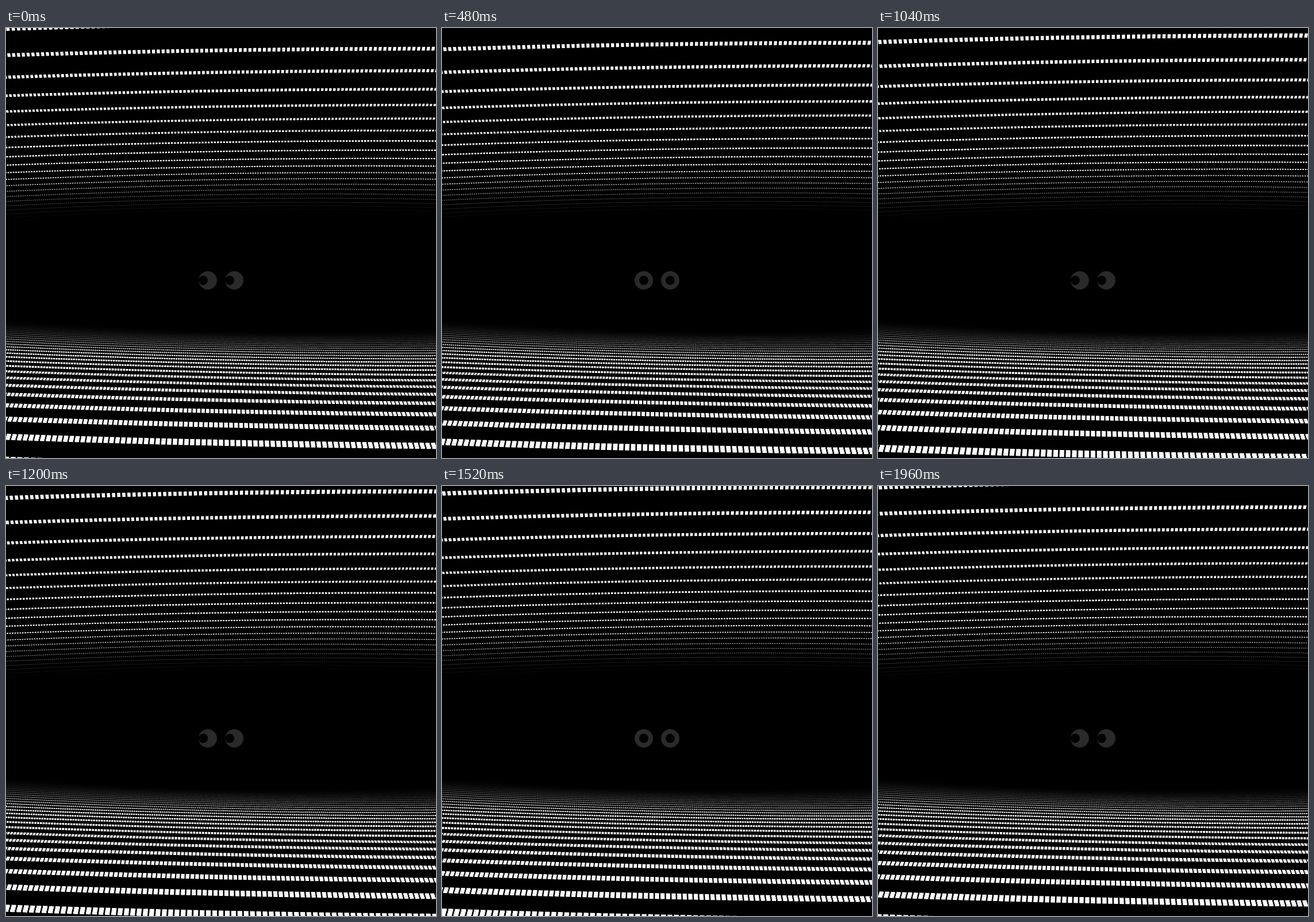
An HTML page without scripts that plays this animation: 748 by 748 pixels, repeating every 2000 ms.

```html
<!DOCTYPE html>
<html lang="en">
<head>
<meta charset="utf-8">
<title>Eyes between two dotted planes</title>
<style>
@property --t { syntax: "<number>"; inherits: true; initial-value: 0; }

html, body { margin: 0; width: 100%; height: 100%; overflow: hidden; background: #000; }
svg { display: block; width: 748px; height: 748px; animation: flow 2s linear infinite; }
@keyframes flow { from { --t: 0; } to { --t: 1; } }

/* --g side, --z0 nearest depth, --a plane height, --th dot height at --u0 */
.sky {
  --g: -1; --z0: 9.485; --a: 4604; --tilt: 5.75; --bow: 2.9;
  --th: 6.3; --u0: 440; --e: 1.8; --gap: .0191; --on: .62;
  --far: 30.485; --fade: 11;
}
.floor {
  --g: 1; --z0: 6.88; --a: 1675; --tilt: 8; --bow: 2.5;
  --th: 10.3; --u0: 243; --e: 1.6; --gap: .0411; --on: .74;
  --far: 34.88; --fade: 18;
}

/* one row of dots: depth z gives the distance u from the horizon */
path {
  --s: 0;
  --n: 1;
  --i: calc(var(--k) - var(--t));
  --z: calc(var(--z0) + var(--i));
  --u: calc(var(--a) / var(--z));
  --w: calc(var(--th) * pow(var(--u) / var(--u0), var(--e)));
  --p: calc(var(--gap) * (var(--u) + var(--s) * var(--w) * .07));
  d: path("M0 0Q.5 0 1 1M0 0Q-.5 0 -1 1");
  fill: none;
  stroke: #fff;
  vector-effect: non-scaling-stroke;
  transform: matrix(380, calc(var(--g) * var(--tilt)), 0,
    calc(var(--g) * -1 * (var(--bow) + .015 * var(--i) * var(--i))),
    374, calc(478 + var(--g) * (var(--u) + var(--s) * var(--w) / 3)));
  stroke-width: calc(var(--w) * var(--n) * 1px);
  stroke-dasharray: calc(var(--p) * var(--on) * 1px) calc(var(--p) * (1 - var(--on)) * 1px);
  stroke-dashoffset: calc(var(--p) * var(--on) * .5px);
  opacity: calc(pow(max(0, (var(--far) - var(--z)) / var(--fade)), 1.8));
}
/* near rows are three thin layers, so the dots lean */
g g path { --n: .37; }
g g path:nth-child(1) { --s: -1; }
g g path:nth-child(3) { --s: 1; }

.pupils { animation: look 1s linear infinite; }
@keyframes look {
  0%, 20% { transform: translateX(-8px); }
  30%, 54% { transform: translateX(0); }
  64%, 100% { transform: translateX(-8px); }
}
</style>
</head>
<body>
<svg width="748" height="748" xmlns="http://www.w3.org/2000/svg">
  <rect width="748" height="748"/>
  <g class="sky">
    <g style="--k:0"><path/><path/><path/></g>
    <g style="--k:1"><path/><path/><path/></g>
    <g style="--k:2"><path/><path/><path/></g>
    <g style="--k:3"><path/><path/><path/></g>
    <g style="--k:4"><path/><path/><path/></g>
    <g style="--k:5"><path/><path/><path/></g>
    <g style="--k:6"><path/><path/><path/></g>
    <path style="--k:7"/>
    <path style="--k:8"/>
    <path style="--k:9"/>
    <path style="--k:10"/>
    <path style="--k:11"/>
    <path style="--k:12"/>
    <path style="--k:13"/>
    <path style="--k:14"/>
    <path style="--k:15"/>
    <path style="--k:16"/>
    <path style="--k:17"/>
    <path style="--k:18"/>
    <path style="--k:19"/>
    <path style="--k:20"/>
    <path style="--k:21"/>
  </g>
  <g class="floor">
    <g style="--k:-1"><path/><path/><path/></g>
    <g style="--k:0"><path/><path/><path/></g>
    <g style="--k:1"><path/><path/><path/></g>
    <g style="--k:2"><path/><path/><path/></g>
    <g style="--k:3"><path/><path/><path/></g>
    <g style="--k:4"><path/><path/><path/></g>
    <g style="--k:5"><path/><path/><path/></g>
    <g style="--k:6"><path/><path/><path/></g>
    <path style="--k:7"/>
    <path style="--k:8"/>
    <path style="--k:9"/>
    <path style="--k:10"/>
    <path style="--k:11"/>
    <path style="--k:12"/>
    <path style="--k:13"/>
    <path style="--k:14"/>
    <path style="--k:15"/>
    <path style="--k:16"/>
    <path style="--k:17"/>
    <path style="--k:18"/>
    <path style="--k:19"/>
    <path style="--k:20"/>
    <path style="--k:21"/>
    <path style="--k:22"/>
    <path style="--k:23"/>
    <path style="--k:24"/>
    <path style="--k:25"/>
    <path style="--k:26"/>
    <path style="--k:27"/>
    <path style="--k:28"/>
  </g>
  <g fill="#2a2a2a">
    <circle cx="351" cy="439" r="16"/>
    <circle cx="397" cy="439" r="16"/>
  </g>
  <g class="pupils">
    <circle cx="351" cy="439" r="8"/>
    <circle cx="397" cy="439" r="8"/>
  </g>
</svg>
</body>
</html>
```
